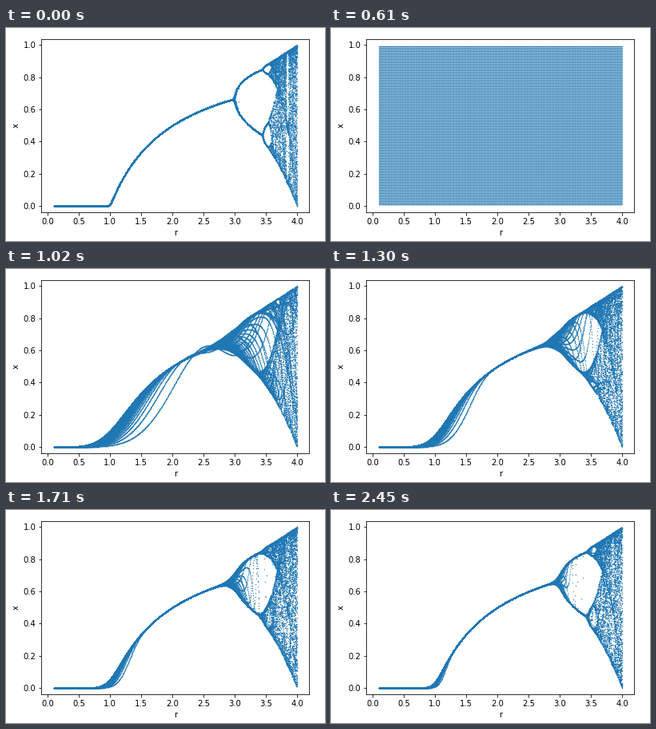
Animation, 399 px wide and 267 px high, one loop 2.52 s. Source, as a matplotlib script:

```python
import numpy as np
import matplotlib.pyplot as plt
from matplotlib.animation import FuncAnimation
from matplotlib.lines import Line2D

WIDTH, HEIGHT, DPI = 399, 267, 72
LOOP_MS, TICK_MS, SLOTS = 2520, 20, 37
RESTART = 9                        # slot where the iteration starts over
HOLDS = (3, 8, 16, 21, 27, 32)     # slots that repeat the previous picture
LAST = 99                          # final iteration before the restart

plt.rcParams.update({"font.family": "DejaVu Sans", "font.size": 10})


def logistic_orbits():
    """Iterate x -> r x (1 - x) for a grid of rates and starting values."""
    rates, x = np.meshgrid(np.linspace(0.1, 4.0, 1000), np.linspace(0.01, 0.99, 100))
    orbits = [x.ravel()]
    for _ in range(LAST):
        x = rates * x * (1 - x)
        orbits.append(x.ravel())
    return rates.ravel(), orbits


def iteration(slot):
    first = RESTART if slot >= RESTART else 0
    step = slot - first - sum(first < h <= slot for h in HOLDS)
    return step if first else LAST - 6 + step


rates, orbits = logistic_orbits()

fig = plt.figure(figsize=(WIDTH / DPI, HEIGHT / DPI), dpi=DPI, facecolor="white")
ax = fig.add_axes([44.4 / WIDTH, 36 / HEIGHT, 334.8 / WIDTH, 217.44 / HEIGHT])
ax.set(xlim=(-0.095, 4.195), ylim=(-0.039, 1.039), xlabel="r", ylabel="x")
ax.set_xticks(np.arange(0, 4.1, 0.5))
ax.set_yticks(np.arange(0, 1.1, 0.2))
dots, = ax.plot([], [], ".", ms=0.5, color="#1f77b4")
fig.add_artist(Line2D([0, 1], [0.5 / HEIGHT] * 2, color="#f0f0f0", lw=1))


def update(i):
    slot = (i * TICK_MS + TICK_MS - 1) * SLOTS // LOOP_MS
    dots.set_data(rates, orbits[iteration(slot)])
    return dots,


anim = FuncAnimation(fig, update, frames=LOOP_MS // TICK_MS, interval=TICK_MS,
                     repeat=True, repeat_delay=0, blit=False)
plt.show()
```
